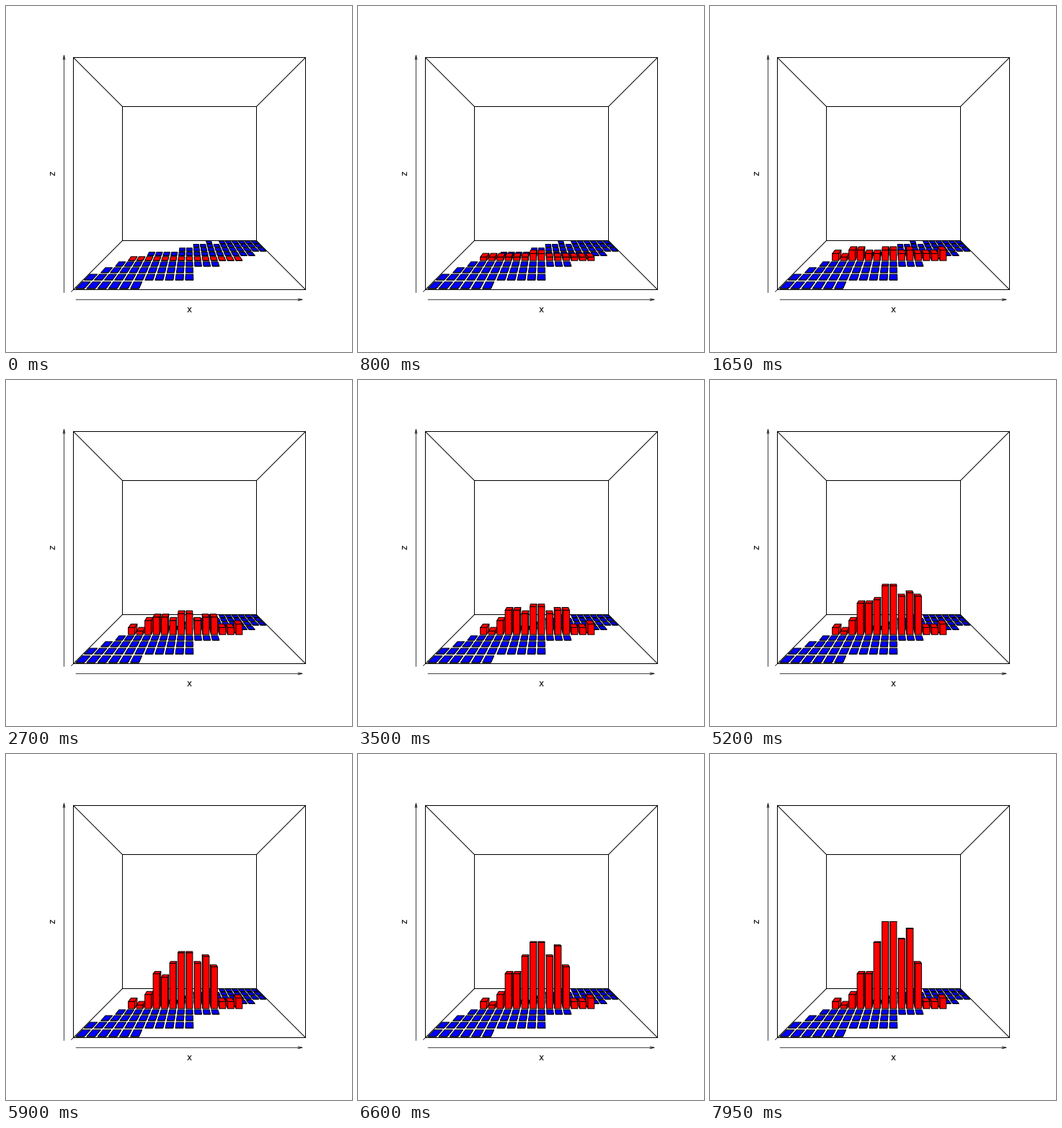
A matplotlib script that plays this animation: 480 by 480 pixels, repeating every 8000 ms.

```python
import numpy as np
import matplotlib.pyplot as plt
from matplotlib.animation import FuncAnimation
from matplotlib.collections import PolyCollection

SIZE, DPI = 480, 80
PX = 72 / DPI                 # one pixel in points
CX, CY, HALF = 254.5, 232.5, 161
EYE = 2.735                   # eye to front plane; the box is 2 deep
COLS, ROWS, LEVELS = 21, 9, 50
GAP = 0.115
RED_ROW = 4
HOLE = (14, 8)

# final heights of the red bars; each step adds one unit to one bar
TOTALS = np.array([2, 1, 4, 10, 10, 19, 25, 25, 20, 23, 13, 2, 2, 3])
STEPS = TOTALS.sum()


def row_cols(row):
    """Occupied columns: a band running from front left to back right."""
    first = int(np.interp(row, [0, 1, 4, 5, 6, 8], [0, 0, 3, 5, 9, 13]))
    last = int(np.interp(row, [0, 1, 2, 4, 6], [5, 10, 10, 16, 20]))
    return [c for c in range(first, last + 1) if (c, row) != HOLE]


def build_history():
    """Low bars fill up first; the bar lagging most gets the next unit."""
    finish = np.minimum(STEPS, 10 + 7.7 * TOTALS)
    now = np.zeros_like(TOTALS)
    history = [now.copy()]
    for step in range(1, STEPS + 1):
        goal = TOTALS * np.minimum(1, step / finish) ** 1.3
        lag = np.where(now < TOTALS, goal - now, -np.inf)
        now[lag.argmax()] += 1
        history.append(now.copy())
    return history


def project(col, row, level):
    s = HALF * EYE / (EYE + 2 * row / ROWS)
    return (CX + s * (2 * col / COLS - 1),
            CY + s * (1 - 2 * level / LEVELS))


def bar_faces(col, row, h):
    x0, x1 = col + GAP, col + 1 - GAP
    y0, y1 = row + GAP, row + 1 - GAP
    side = x1 if x0 + x1 < COLS else x0

    def quad(*pts):
        return [project(*p) for p in pts]

    return [
        quad((side, y0, 0), (side, y1, 0), (side, y1, h), (side, y0, h)),
        quad((x0, y0, h), (x1, y0, h), (x1, y1, h), (x0, y1, h)),
        quad((x0, y0, 0), (x1, y0, 0), (x1, y0, h), (x0, y0, h)),
    ]


def row_faces(row, heights=None):
    """Faces of one row, outer columns first."""
    cols = row_cols(row)
    if heights is None:
        heights = [0] * len(cols)
    cells = sorted(zip(cols, heights), key=lambda c: -abs(c[0] + 0.5 - COLS / 2))
    return [f for c, h in cells for f in bar_faces(c, row, h)]


fig = plt.figure(figsize=(SIZE / DPI, SIZE / DPI), dpi=DPI, facecolor="white")
ax = fig.add_axes([0, 0, 1, 1])
ax.set_xlim(0, SIZE)
ax.set_ylim(SIZE, 0)
ax.axis("off")


def line(*pts, width=1.0):
    xs, ys = zip(*pts)
    ax.plot(xs, ys, color="black", lw=width * PX, zorder=1, snap=False,
            solid_capstyle="round", solid_joinstyle="round")


def make_bars(faces, color, z):
    bars = PolyCollection(faces, facecolors=color, edgecolors="black",
                          linewidths=PX, joinstyle="round", zorder=z)
    bars.set_snap(False)
    ax.add_collection(bars, autolim=False)
    return bars


# box
corners = [(0, 0), (COLS, 0), (COLS, LEVELS), (0, LEVELS)]
front = [project(c, 0, z) for c, z in corners]
back = [project(c, ROWS, z) for c, z in corners]
line(*front, front[0])
line(*back, back[0])
for a, b in zip(front, back):
    line(a, b)

# axis arrows and labels
THIN = 0.75
line((80.5, 397.5), (80.5, 68.5), width=THIN)
line((79, 74.5), (80.5, 68.5), (82, 74.5), width=THIN)
line((97, 407.3), (411, 407.3), width=THIN)
line((405, 405.8), (411, 407.3), (405, 408.8), width=THIN)
line((90.5, 396.5), (93.5, 393.5), width=THIN)
label = dict(family="DejaVu Sans", size=12 * PX, color="black",
             ha="center", va="center")
ax.text(254.5, 421.8, "x", **label)
ax.text(65.3, 232.2, "z", rotation=90, **label)

# flat cells, back to front
flat = []
for row in reversed(range(ROWS)):
    if row != RED_ROW:
        flat += row_faces(row)
make_bars(flat, "#0000ff", 2)

HISTORY = build_history()
red = make_bars(row_faces(RED_ROW, HISTORY[0]), "#ff0000", 3)


def update(i):
    red.set_verts(row_faces(RED_ROW, HISTORY[i]))
    return [red]


anim = FuncAnimation(fig, update, frames=len(HISTORY), interval=50,
                     repeat=True, repeat_delay=0, blit=False)
plt.show()
```
